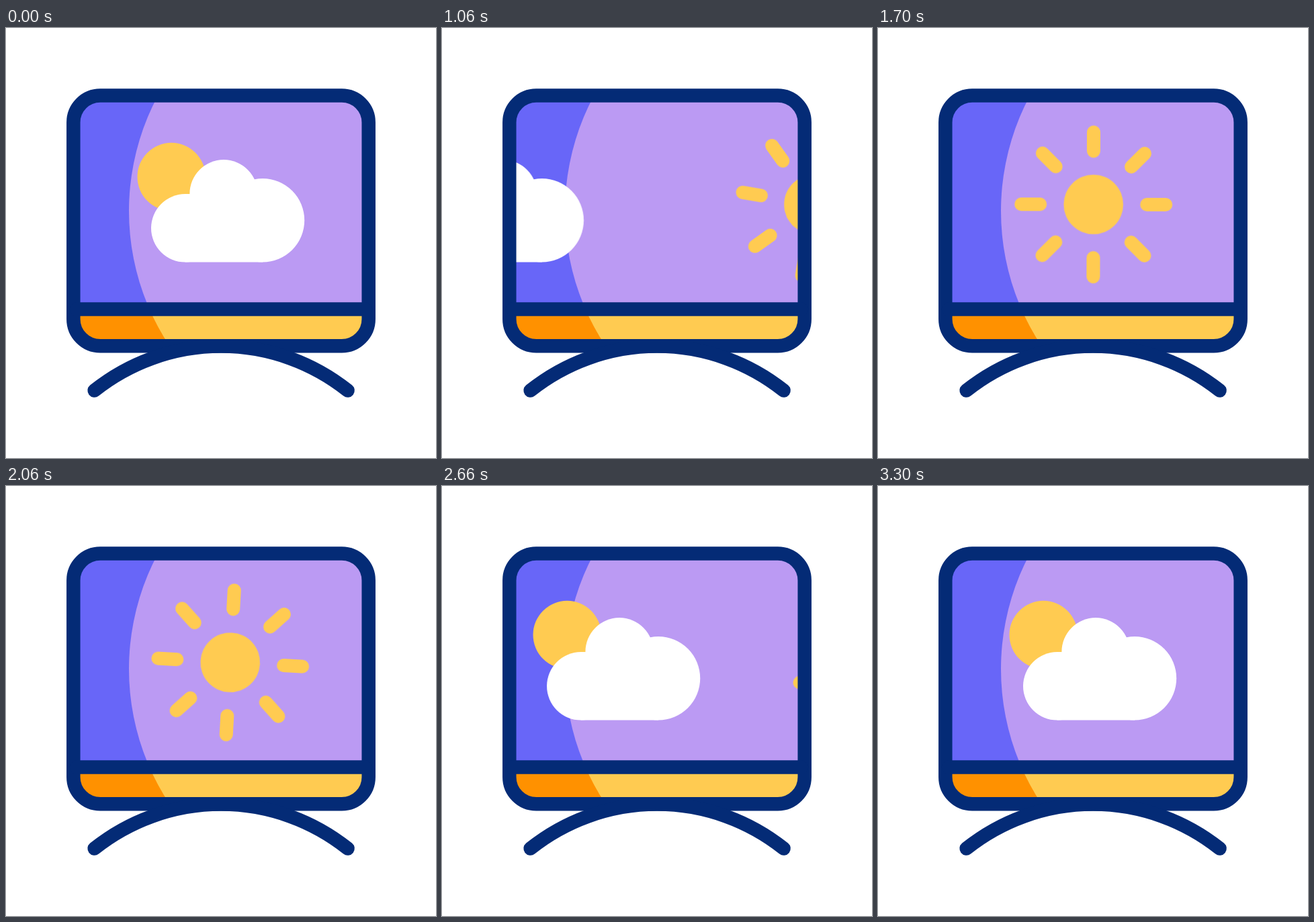
Animation, 640 px wide and 640 px high, one loop 3.6 s. Source, as an HTML page:

```html
<!DOCTYPE html>
<html lang="en">
<head>
<meta charset="utf-8">
<title>Weather on TV</title>
<style>
  :root {
    --navy: #042b76;
    --blue: #6866f8;
    --purple: #bb9af3;
    --orange: #ff9100;
    --yellow: #ffcb51;
  }
  html, body {
    margin: 0;
    width: 100%;
    height: 100%;
    overflow: hidden;
    background: #fff;
  }
  svg { display: block; width: 100%; height: 100%; }

  .line { fill: none; stroke: var(--navy); stroke-width: 20.5; stroke-linecap: round; }
  .yellow { fill: var(--yellow); }
  .ray { stroke: var(--yellow); stroke-width: 20; stroke-linecap: round; }

  .cloudy { animation: cloudy 3600ms infinite; }
  .sunny { animation: sunny 3600ms infinite; transform-origin: 0 0; }

  @keyframes cloudy {
    0%, 5.556% {
      transform: translateX(0);
      animation-timing-function: cubic-bezier(.783, 0, .292, 1);
    }
    49.083% {
      transform: translateX(-400px);
      animation-timing-function: cubic-bezier(.675, 0, .126, 1);
    }
    92.222%, 100% { transform: translateX(0); }
  }

  /* The sun rolls in from the right and back out again. */
  @keyframes sunny {
    0%, 12.306% {
      transform: translateX(385px) rotate(90deg);
      animation-timing-function: cubic-bezier(.7, 0, .3, 1);
    }
    49.056%, 49.556% {
      transform: translateX(0) rotate(0deg);
      animation-timing-function: cubic-bezier(.7, 0, .3, 1);
    }
    88.222%, 100% { transform: translateX(385px) rotate(90deg); }
  }
</style>
</head>
<body>
<svg viewBox="0 0 640 640">
  <defs>
    <clipPath id="panel"><rect x="100" y="100" width="440" height="373" rx="40"/></clipPath>
    <clipPath id="screen"><rect x="100" y="100" width="440" height="318"/></clipPath>
    <clipPath id="base"><rect x="100" y="418" width="440" height="60"/></clipPath>
    <circle id="light" cx="547.5" cy="272.5" r="364.5"/>
    <line id="ray" class="ray" x1="79.5" x2="107.5"/>
  </defs>

  <g clip-path="url(#panel)">
    <g clip-path="url(#screen)">
      <rect width="640" height="640" fill="var(--blue)"/>
      <use href="#light" fill="var(--purple)"/>
      <g class="cloudy">
        <circle class="yellow" cx="246.2" cy="221.5" r="50.7"/>
        <g fill="#fff">
          <circle cx="266.7" cy="297.8" r="50.7"/>
          <circle cx="324" cy="246.7" r="50.6"/>
          <circle cx="382" cy="286.3" r="62.2"/>
          <rect x="266.7" y="247.1" width="115.3" height="101.4"/>
        </g>
      </g>
      <g transform="translate(320 262.6)">
        <g class="sunny">
          <circle class="yellow" r="44.3"/>
          <use href="#ray"/>
          <use href="#ray" transform="rotate(45)"/>
          <use href="#ray" transform="rotate(90)"/>
          <use href="#ray" transform="rotate(135)"/>
          <use href="#ray" transform="rotate(180)"/>
          <use href="#ray" transform="rotate(225)"/>
          <use href="#ray" transform="rotate(270)"/>
          <use href="#ray" transform="rotate(315)"/>
        </g>
      </g>
    </g>
    <g clip-path="url(#base)">
      <rect width="640" height="640" fill="var(--orange)"/>
      <use href="#light" class="yellow"/>
    </g>
  </g>

  <rect class="line" x="100.3" y="100.6" width="439.4" height="372.6" rx="40"/>
  <path class="line" d="M105 418.6H535"/>
  <path class="line" d="M131.6 539.5A302.5 302.5 0 0 1 508.6 539.5"/>
</svg>
</body>
</html>
```
